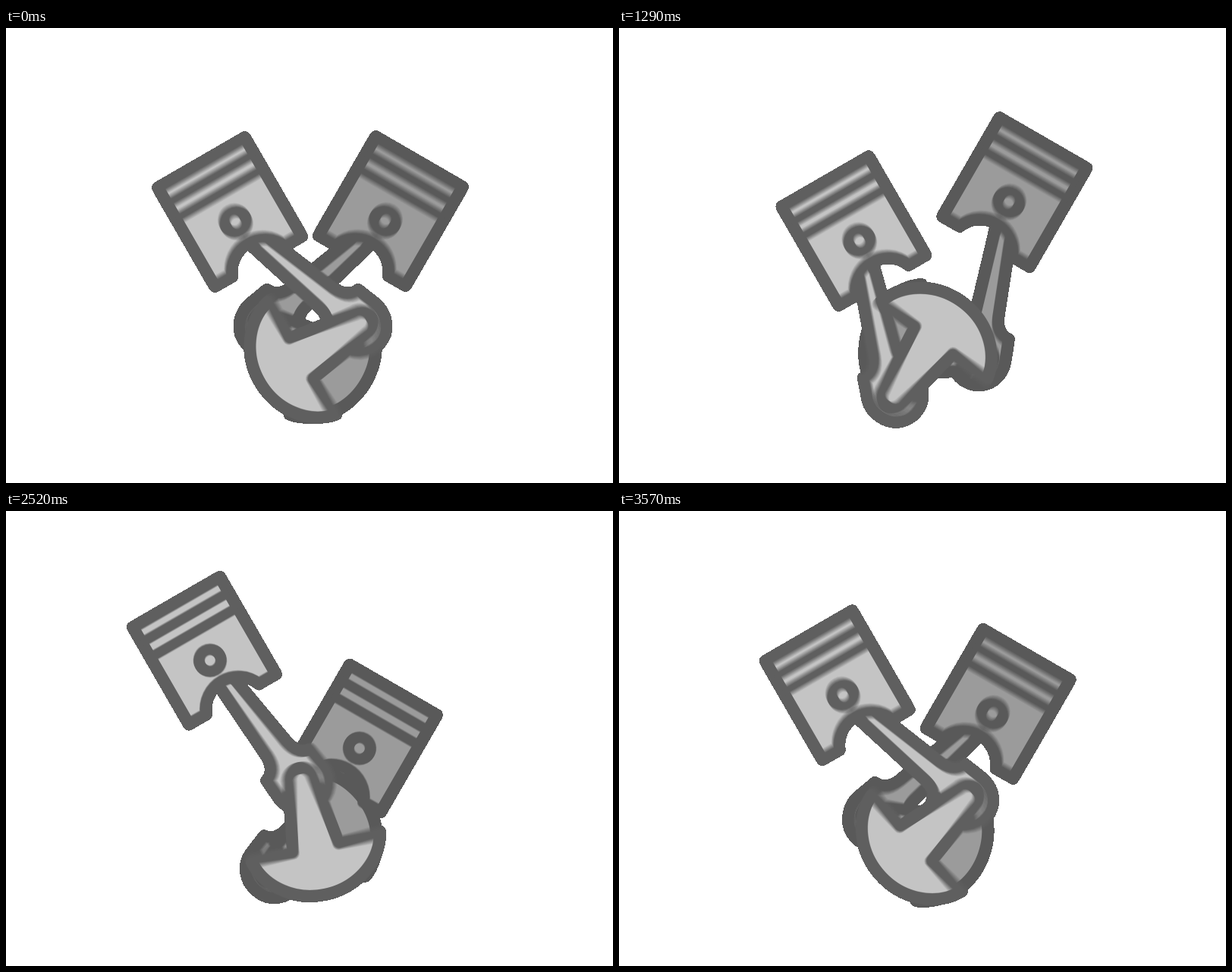
An HTML page with a canvas that plays this animation: 800x600 px, repeating every 3.6 s.

```html
<!DOCTYPE html>
<html lang="en">
<head>
<meta charset="utf-8">
<title>V-twin engine</title>
<style>
  html, body { margin: 0; width: 800px; height: 600px; overflow: hidden; background: #fff; }
  canvas { display: block; }
</style>
</head>
<body>
<canvas id="stage" width="800" height="600"></canvas>
<script>
const STEP = 30, STEPS = 30;            // one revolution takes 900 ms
const SHUTTER = 6, SAMPLES = 9;         // motion blur, in degrees of crank rotation
const EDGE = 0.25;                      // coverage that counts as solid
const BOX = { x: 150, y: 66, w: 504, h: 482 };
const CRANK = { x: 404.5, y: 426.5, r: 70 };
const rad = deg => deg * Math.PI / 180;

const stage = document.getElementById('stage').getContext('2d');
const layer = document.createElement('canvas');
layer.width = BOX.w;
layer.height = BOX.h;
const ctx = layer.getContext('2d', { willReadFrequently: true });

// Rod: crank pin at the origin, piston towards +x
const rodPath = new Path2D(
  'M190 10 L56 15.5 Q33 17 29 34.5 L0 35.5 A35.5 35.5 0 0 1 0 -35.5 ' +
  'L29 -34.5 Q33 -17 56 -15.5 L190 -10 Z');

// Crank: shaft at the origin, arm towards +x, counterweight behind
const crankPath = new Path2D(
  'M73 -16.5 A16.5 16.5 0 0 1 73 16.5 L-18 31 L-17 87 ' +
  'A81 89 0 0 1 -17 -87 L-18 -31 Z');

// Piston: pin at the origin, crown towards -y
const pistonPath = new Path2D(
  'M-66.3 -88.5 H66.3 V58.7 H40 A43 43 0 0 0 -40 58.7 H-66.3 Z');
const ringPath = new Path2D('M-66 -65.5 H66 M-66 -42.5 H66');
const pinPath = new Path2D('M14.5 0 A14.5 14.5 0 1 1 -14.5 0 A14.5 14.5 0 1 1 14.5 0 Z');

function place(x, y, angle, draw) {
  ctx.save();
  ctx.translate(x, y);
  ctx.rotate(angle);
  draw();
  ctx.restore();
}

function shape(path) {
  ctx.lineWidth = 16;
  ctx.fill(path);
  ctx.stroke(path);
}

function lines(path, width) {
  ctx.lineWidth = width;
  ctx.stroke(path);
}

// side is -1 for the left cylinder, 1 for the right
function cylinder(side, deg, fill, line) {
  const s = Math.sin(rad(deg));
  const px = 401 + side * 98.5 + 35.3 * s;
  const py = 255 - side * (61.5 * s + 0.5);
  const turn = rad(deg - 90 - side * 60);
  const cx = CRANK.x + CRANK.r * Math.cos(turn);
  const cy = CRANK.y + CRANK.r * Math.sin(turn);

  ctx.fillStyle = fill;
  ctx.strokeStyle = line;
  place(cx, cy, Math.atan2(py - cy, px - cx), () => shape(rodPath));
  place(CRANK.x, CRANK.y, turn, () => shape(crankPath));
  place(px, py, rad(side * 30), () => {
    shape(pistonPath);
    lines(pinPath, 15);
    lines(ringPath, 13.5);
  });
}

function drawEngine(deg) {
  ctx.setTransform(1, 0, 0, 1, 0, 0);
  ctx.clearRect(0, 0, BOX.w, BOX.h);
  ctx.translate(-BOX.x, -BOX.y);
  ctx.lineJoin = 'round';
  cylinder(1, deg, '#9b9b9b', '#595959');
  cylinder(-1, deg, '#c4c4c4', '#5f5f5f');
}

// Average the samples inside the shutter, keeping a hard silhouette
function render(step) {
  const count = BOX.w * BOX.h;
  const grey = new Float32Array(count), cover = new Float32Array(count);
  for (let k = 0; k < SAMPLES; k++) {
    drawEngine(step * 360 / STEPS + ((k + 0.5) / SAMPLES - 0.5) * SHUTTER);
    const px = ctx.getImageData(0, 0, BOX.w, BOX.h).data;
    for (let i = 0; i < count; i++) {
      const a = px[i * 4 + 3];
      if (a) {
        cover[i] += a;
        grey[i] += px[i * 4] * a;
      }
    }
  }
  const image = stage.createImageData(BOX.w, BOX.h);
  for (let i = 0; i < count; i++) {
    if (cover[i] > SAMPLES * 255 * EDGE) {
      image.data.fill(Math.round(grey[i] / cover[i]), i * 4, i * 4 + 3);
      image.data[i * 4 + 3] = 255;
    }
  }
  return image;
}

const cache = [];
const start = performance.now();
let shown = -1;

function tick() {
  const step = Math.floor((performance.now() - start) / STEP) % STEPS;
  if (step !== shown) {
    cache[step] = cache[step] || render(step);
    stage.putImageData(cache[step], BOX.x, BOX.y);
    shown = step;
  }
  requestAnimationFrame(tick);
}
tick();
</script>
</body>
</html>
```
